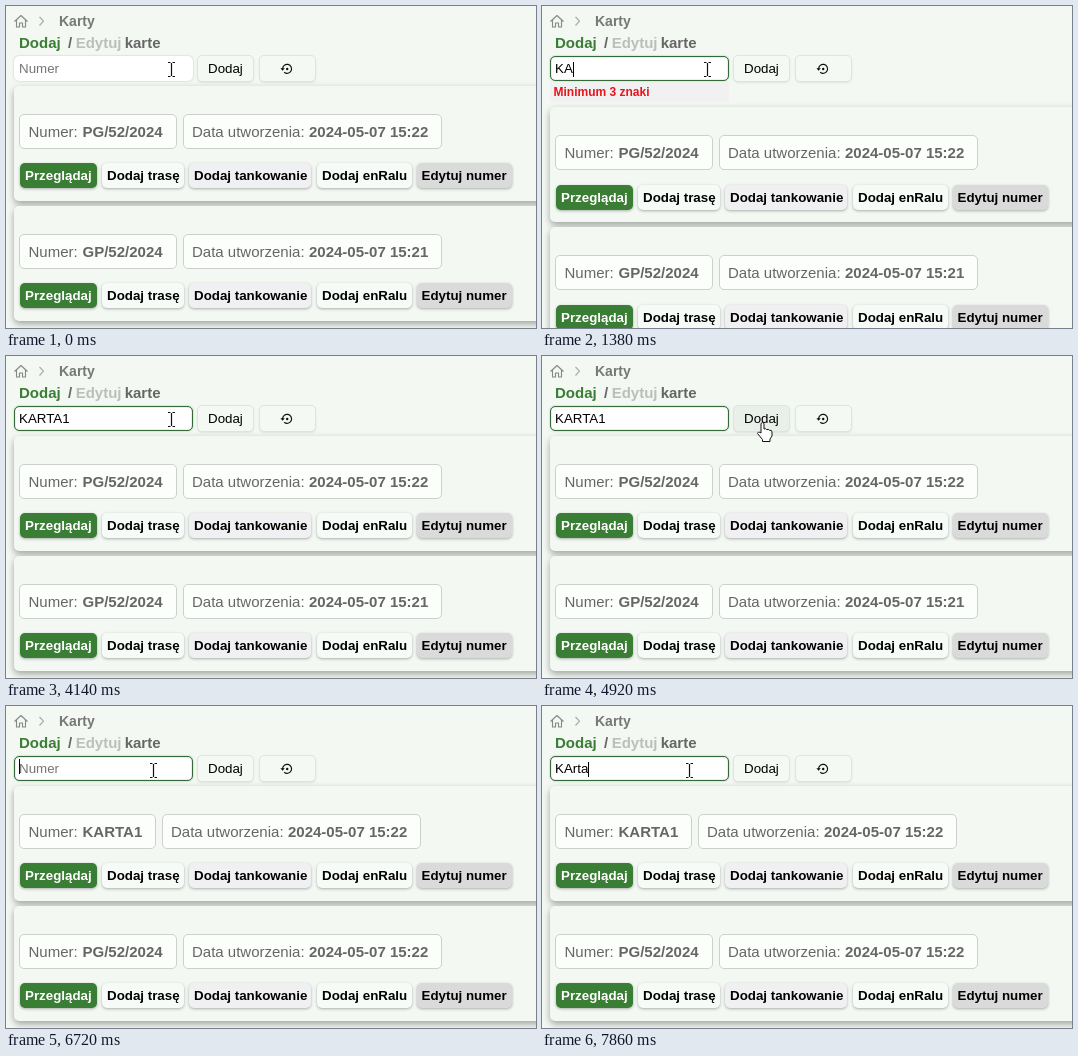
Animation of 530 by 322 pixels, one loop 8 s. Source, as an HTML page:

```html
<!DOCTYPE html>
<html lang="pl">
<head>
<meta charset="utf-8">
<title>Karty</title>
<style>
html, body { margin: 0; width: 530px; height: 322px; overflow: hidden; }
body { position: relative; background: #f3f8f3; font-family: "Liberation Sans", Arial, sans-serif; }
div, svg { position: absolute; box-sizing: border-box; }
.t { white-space: pre; line-height: 20px; font-size: 15px; color: #666; }
.b { font-weight: bold; }
.small { font-size: 13.333px; margin-top: 1px; }
.tiny { font-size: 12px; margin-top: 1px; }
.btn { border-radius: 5px; background: #f5faf5; box-shadow: 0 1px 3px rgba(0,0,0,.3); }
.top { background: #f4f9f4; border: 1px solid #dde5dd; box-shadow: 0 1px 2px rgba(0,0,0,.08); }
.card { width: 540px; height: 115px; border-radius: 5px; background: #f3f8f3; box-shadow: 0 3px 7px rgba(0,0,0,.34); }
.chip { border: 1px solid #cdd1cd; border-radius: 5px; background: #fbfefb; }
#field { left: 8px; top: 50px; width: 179px; height: 25px; border-radius: 5px; background: #fff; box-shadow: 0 0 2px rgba(0,0,0,.25); }
#ring { inset: 0; border: 1px solid #346a37; border-radius: 5px; box-shadow: inset 0 0 1px #346a37; }
#value { left: 5px; top: 2px; display: flex; align-items: center; color: #000; }
#caret { width: 1px; height: 15px; background: #000; margin-right: -1px; }
#error { left: 8px; top: 76px; width: 179px; height: 20px; background: #f1f1f1; }
</style>
</head>
<body>
<script>
const NS = "http://www.w3.org/2000/svg";

function box(parent, cls, x, y, w, h) {
  const e = document.createElement("div");
  e.className = cls;
  Object.assign(e.style, { left: x + "px", top: y + "px" });
  if (w) Object.assign(e.style, { width: w + "px", height: h + "px" });
  parent.append(e);
  return e;
}

function named(parent, id, cls = "") {
  const e = document.createElement("div");
  e.id = id;
  e.className = cls;
  parent.append(e);
  return e;
}

// y is the baseline
function text(parent, str, x, y, cls = "", color = "") {
  const e = box(parent, "t " + cls, x, y - 15);
  e.textContent = str;
  e.style.color = color;
  return e;
}

function icon(x, y, w, h, paths) {
  const s = document.createElementNS(NS, "svg");
  s.setAttribute("width", w);
  s.setAttribute("height", h);
  s.style.left = x + "px";
  s.style.top = y + "px";
  for (const [d, stroke, width, fill = "none"] of paths) {
    const p = document.createElementNS(NS, "path");
    const attrs = { d, stroke, fill, "stroke-width": width, "stroke-linejoin": "round" };
    for (const k in attrs) p.setAttribute(k, attrs[k]);
    s.append(p);
  }
  document.body.append(s);
  return s;
}

const page = document.body;

// heading
icon(7, 8, 16, 15, [["M1.5 7.5 L8 1.5 L14.5 7.5 M3.5 6 V13 H6.5 V9 H9.5 V13 H12.5 V6", "#858985", 1.1]]);
icon(31, 9, 9, 13, [["M2.5 2 L6.5 6.2 L2.5 10.5", "#a9ada9", 1.2]]);
text(page, "Karty", 53, 20, "b", "#777").style.fontSize = "14px";
text(page, "Dodaj", 13, 42, "b", "#3a7d34");
text(page, "/", 62, 42, "b", "#666");
text(page, "Edytuj", 69.7, 42, "b", "#bbbfbb");
text(page, "karte", 118.7, 42, "b", "#666");

// form
const field = named(page, "field");
const hint = text(field, "Numer", 5, 17, "small", "#757575");
const value = named(field, "value", "t small");
const typed = document.createElement("span");
value.append(typed);
const caret = document.createElement("span");
caret.id = "caret";
value.append(caret);
const ring = named(field, "ring");
const add = box(page, "btn top", 191, 49, 57, 27);
text(add, "Dodaj", 10, 17, "small", "#000");
box(page, "btn top", 253, 49, 57, 27);
icon(273, 54.5, 16, 16, [
  ["M3.6 8 A4.5 4.5 0 1 1 5.2 11.3", "#111", 1.2],
  ["M1.4 7.2 H5.8 L3.6 9.8 Z", "none", 0, "#111"],
  ["M7 8 a1.2 1.2 0 1 0 2.4 0 a1.2 1.2 0 1 0 -2.4 0", "none", 0, "#111"]
]);
const error = named(page, "error");
text(error, "Minimum 3 znaki", 3.5, 14, "b tiny", "#e8141c");

// cards
const BUTTONS = [
  ["Przeglądaj", 6, 77, "#3a7d34", "#fff"],
  ["Dodaj trasę", 88, 82, "#f7fbf7"],
  ["Dodaj tankowanie", 175, 122, "#f0eff1"],
  ["Dodaj enRalu", 303, 95, "#f7fbf7"],
  ["Edytuj numer", 402.5, 95, "#dbdadb"]
];

function makeCard() {
  const card = box(page, "card", 8, 0);
  const num = box(card, "chip", 5, 28, 158, 35);
  text(num, "Numer:", 8.5, 22);
  const numText = text(num, "", 62.5, 22, "b");
  const date = box(card, "chip", 169, 28, 259, 35);
  text(date, "Data utworzenia:", 8, 22);
  const dateText = text(date, "", 125, 22, "b");
  for (const [label, x, w, fill, ink = "#000"] of BUTTONS) {
    const b = box(card, "btn", x, 77.4, w, 25);
    b.style.background = fill;
    text(b, label, 5, 17, "b small", ink);
  }
  return (y, name, minute) => {
    const w = name === "KARTA1" ? 137 : 158;
    card.style.top = y + "px";
    num.style.width = w + "px";
    date.style.left = w + 11 + "px";
    numText.textContent = name;
    dateText.textContent = "2024-05-07 15:" + minute;
  };
}
const first = makeCard();
const second = makeCard();

// pointers
const BEAM = "M1 1.5 H3.5 M5.5 1.5 H8 M4.5 2 V15 M1 15.5 H3.5 M5.5 15.5 H8";
const beam = icon(0, 0, 9, 17, [[BEAM, "#111", 1.2]]);
const hand = icon(0, 0, 18, 22, [[
  "M5 12 V2.5 Q6.5 0.5 8 2.5 V8 Q10 7 10.7 8.7 Q12.5 7.7 13.3 9.3 Q15.8 8.5 16 11 V15 L14 18 V20.5 H6.5 V18.5 L1.5 12.5 Q2 10.2 5 12 Z",
  "#111", 1, "#fff"
]]);

const LOOP = 8000, BLINK = 300, FADE = 120;
const CARD_TOP = 80, CARD_STEP = 120, ERROR_SHIFT = 21.2, ADDED = 5220;
const KEYS = [
  [0, ""], [300, ""], [960, "K"], [1380, "KA"], [1440, "KA"], [2820, "KAR"], [2880, "KART"],
  [3000, "KARTA"], [3840, "KARTA1"], [5160, ""], [6120, ""], [6840, "K"], [7200, "KA"],
  [7620, "KAr"], [7740, "KArt"], [7860, "KArta"]
];
const PATH = [[0, 165, 63], [4620, 165, 63], [4920, 220, 66], [5200, 220, 66], [5460, 147, 64], [LOOP, 147, 64]];

const ramp = (t, a, b) => Math.min(1, Math.max(0, (t - a) / (b - a)));
const show = (e, on) => { e.style.visibility = on ? "visible" : "hidden"; };

function pointer(t) {
  const i = PATH.findIndex(p => p[0] > t);
  const [t0, x0, y0] = PATH[i - 1], [t1, x1, y1] = PATH[i];
  const k = ramp(t, t0, t1), s = k * k * (3 - 2 * k);
  return [Math.round(x0 + (x1 - x0) * s), Math.round(y0 + (y1 - y0) * s)];
}

function render(t) {
  const [since, str] = KEYS.filter(k => k[0] <= t).pop();
  const active = (t >= 300 && t < 4740) || t >= 6120;
  typed.textContent = str;
  show(hint, !str);
  show(caret, active && Math.floor((t - since) / BLINK) % 2 === 0);
  ring.style.opacity = ramp(t, 300, 300 + FADE) - ramp(t, 5100, 5100 + FADE) + ramp(t, 6120, 6120 + FADE);

  const short = str.length > 0 && str.length < 3;
  const y = CARD_TOP + (short ? ERROR_SHIFT : 0);
  show(error, short);
  if (t < ADDED) {
    first(y, "PG/52/2024", 22);
    second(y + CARD_STEP, "GP/52/2024", 21);
  } else {
    first(y, "KARTA1", 22);
    second(y + CARD_STEP, "PG/52/2024", 22);
  }

  const [px, py] = pointer(t);
  const over = px > 188;
  show(beam, !over);
  show(hand, over);
  beam.style.left = px - 4 + "px";
  beam.style.top = py - 8 + "px";
  hand.style.left = px - 6 + "px";
  hand.style.top = py - 1 + "px";
  add.style.background = over ? "#e9efe9" : "";
}

const start = performance.now();
function frame(now) {
  render(Math.max(0, now - start) % LOOP);
  requestAnimationFrame(frame);
}
render(0);
requestAnimationFrame(frame);
</script>
</body>
</html>
```
